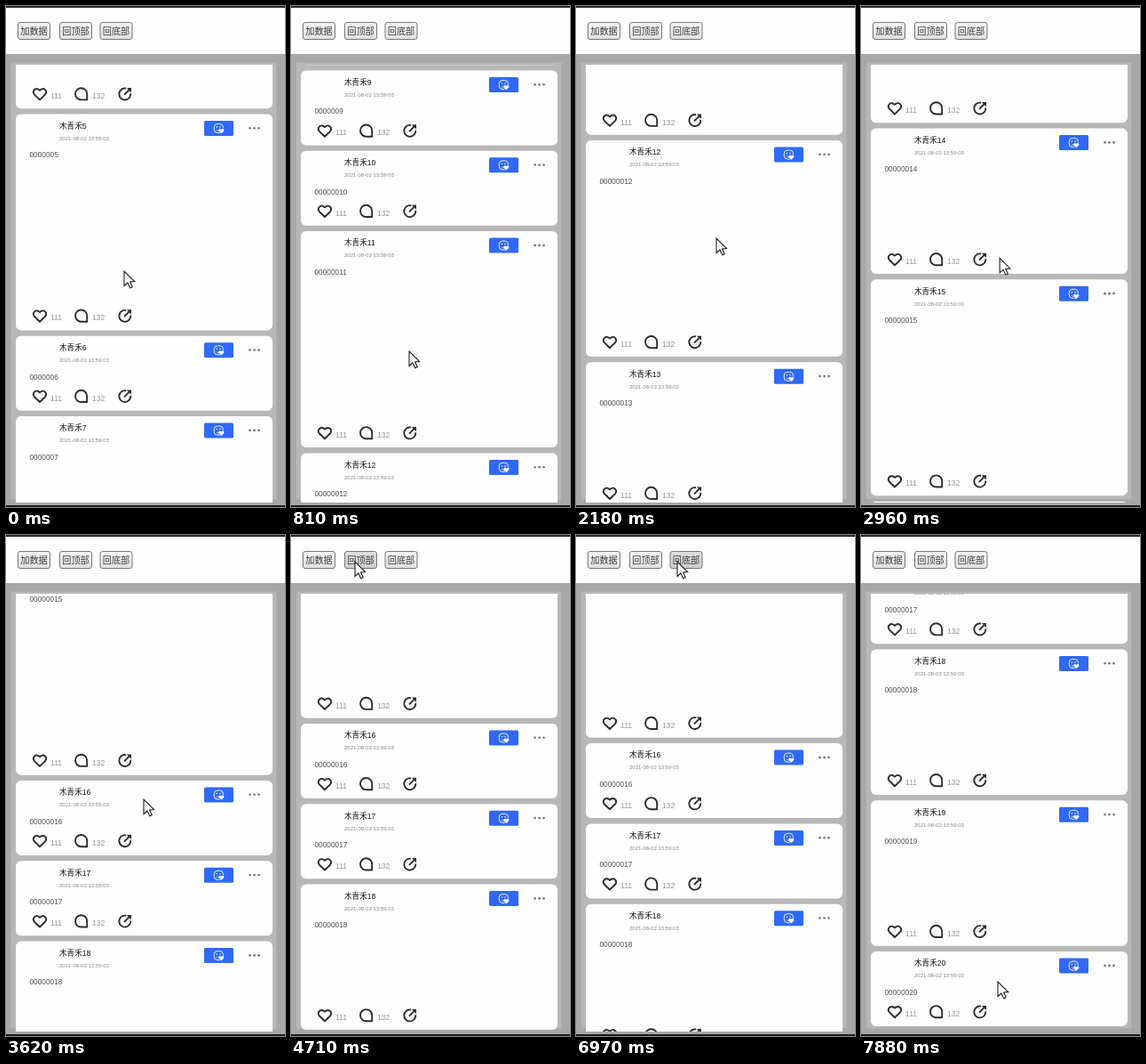
These frames come from a looping animation (314 by 563 pixels, 8 s). An HTML page with a canvas:

```html
<!DOCTYPE html>
<html lang="zh-CN">
<head>
<meta charset="utf-8">
<title>Feed</title>
<style>
html, body { margin: 0; width: 100%; height: 100%; overflow: hidden; background: #a7a7a7; }
canvas { display: block; width: 314px; height: 563px; }
</style>
</head>
<body>
<canvas id="stage"></canvas>
<script>
const W = 314, H = 563, LOOP = 8000;
const canvas = document.getElementById('stage');
const ctx = canvas.getContext('2d');
const dpr = window.devicePixelRatio || 1;
canvas.width = W * dpr;
canvas.height = H * dpr;

const SANS = '"Liberation Sans", "Noto Sans CJK SC", "Noto Sans CJK", sans-serif';
const CJK = '"Noto Sans CJK SC", "Noto Sans CJK", sans-serif';
const USER = '木青禾';

// Card sizes from the first post to the last
const HEIGHT = { S: 84, M: 163.5, L: 243 };
const GAP = 6.3, FIRST = 65.5;
const cards = [];
let next = FIRST;
for (const size of 'MLMSMLSLMSSLLMMLSSMMS') {
  cards.push({ top: next, h: HEIGHT[size] });
  next += HEIGHT[size] + GAP;
}

const SPANS = [[120, 1], [810, 5], [1060, 2], [1180, 1], [2180, 7], [2300, 1],
  [3230, 7], [3350, 1], [3620, 2], [4280, 5], [4430, 1], [4710, 2], [5400, 5],
  [5520, 1], [6160, 4], [6550, 3], [6670, 1], [7100, 3], [7370, 1], [7880, 4]];

function snap(t) {
  let start = 0;
  for (const [end, n] of SPANS) {
    if (t < end) {
      const step = (end - start) / n;
      return start + Math.floor((t - start) / step) * step;
    }
    start = end;
  }
  return start;
}

const scrollAt = (card, y) => cards[card].top - y;

// [time, scroll offset, eased]
const SCROLL = [
  [0, scrollAt(5, 121.5)],
  [810, scrollAt(9, 72.5)],
  [1060, scrollAt(12, 216)],
  [2180, scrollAt(12, 151)],
  [3230, scrollAt(16, 292)],
  [3620, scrollAt(16, 276)],
  [4280, scrollAt(16, 212)],
  [4850, scrollAt(16, 212)],
  [5600, 0, true],
  [6350, 0],
  [7100, scrollAt(18, 128.5), true]
];

const POINTER = [
  [0, 133, 298], [810, 133, 388], [1060, 133, 388], [2180, 158, 261],
  [3230, 155, 297], [3620, 155, 297], [4280, 80, 31], [4710, 72, 30],
  [5520, 72, 30], [6160, 113, 44], [6400, 114, 30], [7240, 114, 30],
  [7880, 154, 502]
];

const ease = p => p * p * (3 - 2 * p);

function segment(keys, t) {
  let i = 1;
  while (i < keys.length - 1 && t >= keys[i][0]) i++;
  const a = keys[i - 1], b = keys[i];
  const p = Math.min(1, Math.max(0, (t - a[0]) / (b[0] - a[0])));
  return { a, b, p };
}

const mix = (a, b, p) => a + (b - a) * p;

function rect(x, y, w, h, fill) {
  ctx.fillStyle = fill;
  ctx.fillRect(x, y, w, h);
}

function rounded(x, y, w, h, r) {
  ctx.beginPath();
  ctx.roundRect(x, y, w, h, r);
}

function text(str, x, y, size, fill, family = SANS) {
  ctx.font = size + 'px ' + family;
  ctx.fillStyle = fill;
  ctx.fillText(str, x, y);
}

function dot(x, y, r) {
  ctx.beginPath();
  ctx.arc(x, y, r, 0, Math.PI * 2);
  ctx.fill();
}

function heartPath(x, y, s) {
  ctx.beginPath();
  ctx.moveTo(x, y + 6.6 * s);
  ctx.lineTo(x - 6 * s, y + 0.8 * s);
  ctx.bezierCurveTo(x - 9.2 * s, y - 3 * s, x - 4.4 * s, y - 8.6 * s, x, y - 4 * s);
  ctx.bezierCurveTo(x + 4.4 * s, y - 8.6 * s, x + 9.2 * s, y - 3 * s, x + 6 * s, y + 0.8 * s);
  ctx.closePath();
}

function actions(y) {
  ctx.strokeStyle = '#2d2d2d';
  ctx.lineWidth = 1.9;
  ctx.lineJoin = 'round';
  ctx.lineCap = 'butt';
  heartPath(38, y, 1);
  ctx.stroke();

  // Speech bubble with a square lower right corner
  ctx.beginPath();
  ctx.arc(84.6, y, 6.6, Math.PI / 2, Math.PI * 2);
  ctx.lineTo(91.2, y + 6.6);
  ctx.closePath();
  ctx.stroke();

  // Share ring and arrow
  ctx.beginPath();
  ctx.arc(133.8, y + 0.2, 6.5, -0.1, Math.PI * 1.56);
  ctx.stroke();
  ctx.beginPath();
  ctx.moveTo(133, y + 1);
  ctx.lineTo(139, y - 5);
  ctx.stroke();
  ctx.fillStyle = '#2d2d2d';
  ctx.beginPath();
  ctx.moveTo(135.8, y - 6.8);
  ctx.lineTo(141, y - 6.8);
  ctx.lineTo(141, y - 1.6);
  ctx.fill();

  text('111', 50, y + 5.3, 8.6, '#979797');
  text('132', 97, y + 5.3, 8.6, '#979797');
}

function badge(y) {
  ctx.fillStyle = '#3069f8';
  rounded(223, y, 33, 17, 1.5);
  ctx.fill();
  const cy = y + 8.5;
  ctx.strokeStyle = ctx.fillStyle = '#fff';
  ctx.lineWidth = 0.9;
  rounded(234.2, cy - 5, 10.2, 10, 3.8);
  ctx.stroke();
  dot(237.4, cy - 1.5, 0.75);
  dot(241, cy - 1.5, 0.75);
  ctx.beginPath();
  ctx.arc(239, cy + 0.7, 2.1, 0.5, 2.6);
  ctx.stroke();
  heartPath(242.3, cy + 2.9, 0.44);
  ctx.lineWidth = 1.2;
  ctx.strokeStyle = '#3069f8';
  ctx.stroke();
  ctx.fill();
}

function drawCard(i, y, h) {
  ctx.fillStyle = '#fefefe';
  rounded(11, y, 289, h, 6);
  ctx.fill();
  text(USER + i, 60, y + 16.2, 8.6, '#111');
  text('2021-08-02 13:59:03', 60, y + 29.2, 6.03, '#858585');
  text('000000' + i, 26.5, y + 48.7, 8.3, '#505050');
  badge(y + 7.5);
  ctx.fillStyle = '#737373';
  for (let k = 0; k < 3; k++) dot(274.5 + k * 5, y + 15.8, 1.3);
  actions(y + h - 16.4);
}

function button(label, x, active) {
  const g = ctx.createLinearGradient(0, 18, 0, 38);
  g.addColorStop(0, active ? '#e0e0e0' : '#f6f6f6');
  g.addColorStop(1, active ? '#cbcbcb' : '#dedede');
  ctx.fillStyle = g;
  ctx.strokeStyle = '#777';
  ctx.lineWidth = 1;
  rounded(x + 0.5, 18.5, 36, 19, 2.5);
  ctx.fill();
  ctx.stroke();
  ctx.textAlign = 'center';
  text(label, x + 18.5, 32, 10.2, '#3c3c3c', CJK);
  ctx.textAlign = 'left';
}

function pointer(x, y) {
  const shape = [0, 0, 0, 16.5, 3.9, 13, 6.7, 18.8, 9.2, 17.7, 6.6, 12, 11.6, 11.6];
  ctx.beginPath();
  for (let i = 0; i < shape.length; i += 2) ctx.lineTo(x + shape[i], y + shape[i + 1]);
  ctx.closePath();
  ctx.fillStyle = '#fff';
  ctx.strokeStyle = '#1c1c1c';
  ctx.lineWidth = 1.1;
  ctx.lineJoin = 'miter';
  ctx.fill();
  ctx.stroke();
}

function draw(t) {
  ctx.setTransform(dpr, 0, 0, dpr, 0, 0);
  rect(0, 0, W, H, '#a7a7a7');
  rect(0, 0, W, 54, '#fefefe');
  rect(0, 0, W, 2, '#2a2a2c');
  rect(5, 63, 300, 492, '#acacac');
  rect(6, 64, 298, 490, '#b7b7b7');

  const s = segment(SCROLL, t);
  const offset = mix(s.a[1], s.b[1], s.b[2] ? ease(s.p) : s.p);
  ctx.save();
  ctx.beginPath();
  ctx.rect(11, 66, 289, 492);
  ctx.clip();
  cards.forEach((c, i) => {
    const y = c.top - offset;
    if (y < 558 && y + c.h > 66) drawCard(i, y, c.h);
  });
  ctx.restore();
  rect(0, 561, W, 2, '#1f1f21');

  button('加数据', 13, false);
  button('回顶部', 60, t >= 4430 && t < 6250);
  button('回底部', 105.5, t >= 6250 && t < 7000);

  const m = segment(POINTER, t);
  pointer(mix(m.a[1], m.b[1], m.p), mix(m.a[2], m.b[2], m.p));
}

const began = performance.now();
function tick() {
  draw(snap((performance.now() - began) % LOOP));
  requestAnimationFrame(tick);
}
tick();
</script>
</body>
</html>
```
